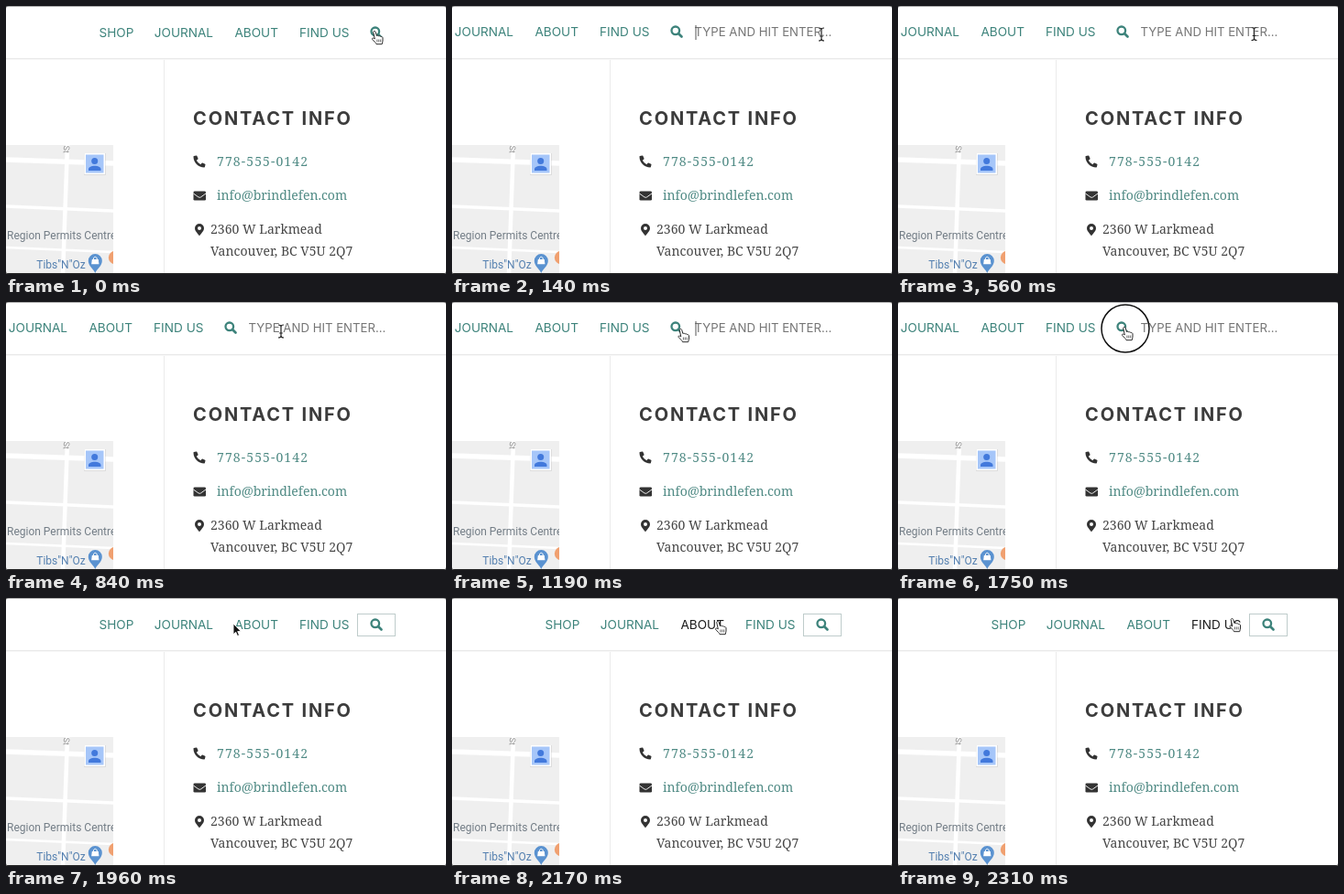
Animation of 480x293 px, one loop 2.38 s. Source, as an HTML page:

```html
<!DOCTYPE html>
<html lang="en">
<head>
<meta charset="utf-8">
<title>Search toggle</title>
<style>
html, body { margin: 0; width: 100%; height: 100%; overflow: hidden; background: #fff; }
svg { display: block; width: 100vw; height: 100vh; }
.nav text, .hint { font: 13.6px Inter, sans-serif; text-anchor: middle; }
.nav text { fill: #3d837b; }
.nav text.hover { fill: #1d1d1d; }
.hint { font-size: 13.2px; fill: #757575; }
.head { font: 700 20px Inter, sans-serif; letter-spacing: 1.8px; text-anchor: middle; fill: #3c3c3c; }
.body { font: 14px "Noto Serif", serif; fill: #464646; }
.link { fill: #4f8a84; }
.map text { font: 12px Roboto, sans-serif; }
.icon { fill: #333; }
</style>
</head>
<body>
<svg viewBox="0 0 480 293" xmlns="http://www.w3.org/2000/svg">
  <defs>
    <clipPath id="mapBox"><rect y="152" width="117" height="141"/></clipPath>
    <g id="lens" fill="none" stroke="#3d837b">
      <circle cx="-1.2" cy="-1.2" r="4.3" stroke-width="2.3"/>
      <path d="M2.2 2.2L5.5 5.5" stroke-width="2.7" stroke-linecap="round"/>
    </g>
  </defs>
  <rect width="480" height="293" fill="#fff"/>

  <!-- map -->
  <g class="map" clip-path="url(#mapBox)">
    <rect y="152" width="117" height="141" fill="#efefef"/>
    <g fill="none" stroke="#fff">
      <path d="M0 168L117 172" stroke-width="5.500"/>
      <path d="M0 219L117 224" stroke-width="3.500"/>
      <path d="M67 152L62 293" stroke-width="4.500"/>
      <path d="M0 264L117 269" stroke-width="2.500"/>
    </g>
    <text transform="translate(63 152.500) rotate(92)" style="font-size:9px" fill="#8a8a8a">St</text>
    <rect x="85" y="161" width="24" height="24" fill="#000" opacity=".08"/>
    <rect x="85.500" y="161" width="22.500" height="23" fill="#fff"/>
    <rect x="87" y="162.500" width="19.500" height="20" fill="#a6c6f9"/>
    <circle cx="96.700" cy="169.500" r="3.500" fill="#4279dc"/>
    <path d="M90 180v-1.500c0-5 13.500-5 13.500 0v1.500z" fill="#4279dc"/>
    <text x="1" y="255" fill="#737d86">Region Permits Centre</text>
    <text x="60" y="287" fill="#5580b0" text-anchor="middle">Tibs"N"Oz</text>
    <path d="M97.300 292C95 286.500 89.800 284.500 89.800 278.500a7.500 7.500 0 0 1 15 0c0 6-5.200 8-7.500 13.500z" fill="#5a92d0"/>
    <path d="M93.800 277h7l.6 5.200h-8.200z" fill="#fff"/>
    <path d="M95.300 277c0-3.600 4-3.600 4 0" fill="none" stroke="#fff"/>
    <circle cx="119" cy="275" r="7.200" fill="#f0a070"/>
  </g>

  <!-- page frame -->
  <path d="M0 57.500H480" stroke="#e9e9e9"/>
  <path d="M0 58.500H480" stroke="#f7f7f7"/>
  <path d="M172.500 59V292" stroke="#ebebeb"/>

  <!-- contact block -->
  <text class="head" x="290.900" y="130.300">CONTACT INFO</text>
  <path class="icon" transform="translate(204.500 163.500) scale(.0254)" d="M497.400 361.800l-112-48a24 24 0 0 0-28 6.900l-49.600 60.600A370.700 370.700 0 0 1 130.600 204.100l60.600-49.600a24 24 0 0 0 6.900-28l-48-112A24 24 0 0 0 122.600.6l-104 24A24 24 0 0 0 0 48c0 256.500 207.900 464 464 464a24 24 0 0 0 23.400-18.600l24-104a24 24 0 0 0-14-27.600z"/>
  <rect class="icon" x="204.500" y="202.500" width="13.500" height="10" rx="1.300"/>
  <path d="M204.500 205l5.400 3.900q1.350.9 2.700 0L218 205" fill="none" stroke="#fff" stroke-width=".9"/>
  <path class="icon" fill-rule="evenodd" d="M211 251.500c-1.200-2.300-5-5.200-5-8.500a5 5 0 0 1 10 0c0 3.300-3.800 6.200-5 8.500zM211 241a2 2 0 1 0 0 4a2 2 0 1 0 0-4z"/>
  <text class="body link" x="230" y="175" letter-spacing="1.100">778-555-0142</text>
  <text class="body link" x="230" y="212">info@brindlefen.com</text>
  <text class="body" x="223" y="249.300">2360 W Larkmead</text>
  <text class="body" x="223" y="273.300">Vancouver, BC V5U 2Q7</text>

  <!-- menu -->
  <g class="nav" id="nav">
    <text x="120.500" y="34">SHOP</text>
    <text x="193.900" y="34">JOURNAL</text>
    <text id="about" x="273.200" y="34">ABOUT</text>
    <text id="find" x="347.300" y="34">FIND US</text>
    <use href="#lens" x="404" y="29"/>
  </g>
  <rect id="focus" x="383.500" y="17.500" width="41" height="24" fill="none" stroke="#7f9996" stroke-dasharray="1 1"/>
  <g id="field">
    <text class="hint" x="339.500" y="33">TYPE AND HIT ENTER...</text>
    <path id="caret" d="M266 21V37" stroke="#555"/>
  </g>

  <!-- pointer -->
  <circle id="ring" cx="248" cy="29" fill="none" stroke="#111" stroke-width="1.500"/>
  <g id="hand" stroke="#2b2b2b" stroke-linejoin="round">
    <path d="M-1.300 .5C-.9-.9.8-.9 1.200.5L2.400 4.600C3.200 3.900 4.400 4.200 4.700 5C5.600 4.500 6.700 4.800 7 5.700C8 5.300 8.800 5.900 9 6.800V10C9 11.500 8.400 12 8.200 13.700H2C1.800 12.300-.6 10.500-2.400 8.400C-3 7.400-1.800 6.600-.6 7.400L.3 8Z" fill="#fff"/>
    <path d="M2.900 8.500V11.500M4.800 8.500V11.500M6.700 8.500V11.500" fill="none" stroke-width=".7"/>
  </g>
  <g id="beam" fill="none">
    <path d="M-3-7Q0-7 0-5Q0-7 3-7M0-5V5M-3 7Q0 7 0 5Q0 7 3 7M-1.800 2H1.800" stroke="#fff" stroke-width="2.400" opacity=".7"/>
    <path d="M-3-7Q0-7 0-5Q0-7 3-7M0-5V5M-3 7Q0 7 0 5Q0 7 3 7M-1.800 2H1.800" stroke="#222" stroke-width="1.200"/>
  </g>
  <path id="arrow" d="M0 0V11.800L2.700 9.300L4.500 13.500L6.500 12.600L4.700 8.600H8.400Z" fill="#111" stroke="#fff" stroke-width=".9"/>

  <path d="M0 .5H480" stroke="#b2b2b2"/>
  <path d="M0 292.500H480" stroke="#222"/>
  <path d="M0 0H3Q0 0 0 3ZM480 0H477Q480 0 480 3ZM0 293H3.500Q0 293 0 289.500ZM480 293H476.500Q480 293 480 289.500Z" fill="#555"/>
</svg>
<script>
const LOOP = 2380, STEP = 70, OPEN = 70, CLOSE = 1960;
const el = id => document.getElementById(id);
const show = (id, on) => el(id).setAttribute("visibility", on ? "visible" : "hidden");
const between = (v, a, b) => v >= a && v < b;

// pointer path: time, x, y
const path = [
  [0, 402, 28], [70, 402, 28], [140, 403, 31], [490, 403, 31],
  [560, 388.5, 30.5], [840, 300, 32], [910, 285, 32], [1050, 263, 32],
  [1120, 254, 31], [1190, 249.5, 30], [1470, 247.5, 28.5], [1750, 247, 28],
  [1960, 248, 28], [2030, 251, 28], [2100, 264, 27], [2170, 290, 26],
  [2240, 330, 24], [2310, 364.5, 23], [2380, 364.5, 23]
];

function pointAt(t) {
  const i = path.findIndex(p => p[0] > t);
  const [a, b] = [path[i - 1], path[i]];
  const k = (t - a[0]) / (b[0] - a[0]);
  return [a[1] + (b[1] - a[1]) * k, a[2] + (b[2] - a[2]) * k];
}

function draw(ms) {
  const t = Math.floor((ms % LOOP) / STEP) * STEP;
  const open = between(t, OPEN, CLOSE);
  const [x, y] = pointAt(t);

  el("nav").setAttribute("transform", open ? "translate(-159 -1)" : "translate(0 0)");
  show("field", open);
  show("caret", between(t, OPEN, 560) || between(t, 1120, 1610));
  show("focus", t >= CLOSE);

  const onAbout = !open && between(x, 249, 298);
  const onFind = !open && between(x, 320, 374);
  el("about").classList.toggle("hover", onAbout);
  el("find").classList.toggle("hover", onFind);

  let kind = "hand";
  if (between(t, 140, 1120)) kind = "beam";
  else if (t >= CLOSE && !onAbout && !onFind) kind = "arrow";
  for (const id of ["hand", "beam", "arrow"]) show(id, id === kind);
  el(kind).setAttribute("transform", `translate(${x} ${y})`);

  const press = Math.max(0, Math.min(1, (t - 1610) / 140));
  show("ring", between(t, 1680, CLOSE));
  el("ring").setAttribute("r", 20 + 6 * press);
  el("ring").setAttribute("opacity", press);
}

const start = performance.now();
function tick() {
  draw(performance.now() - start);
  requestAnimationFrame(tick);
}
tick();
</script>
</body>
</html>
```
